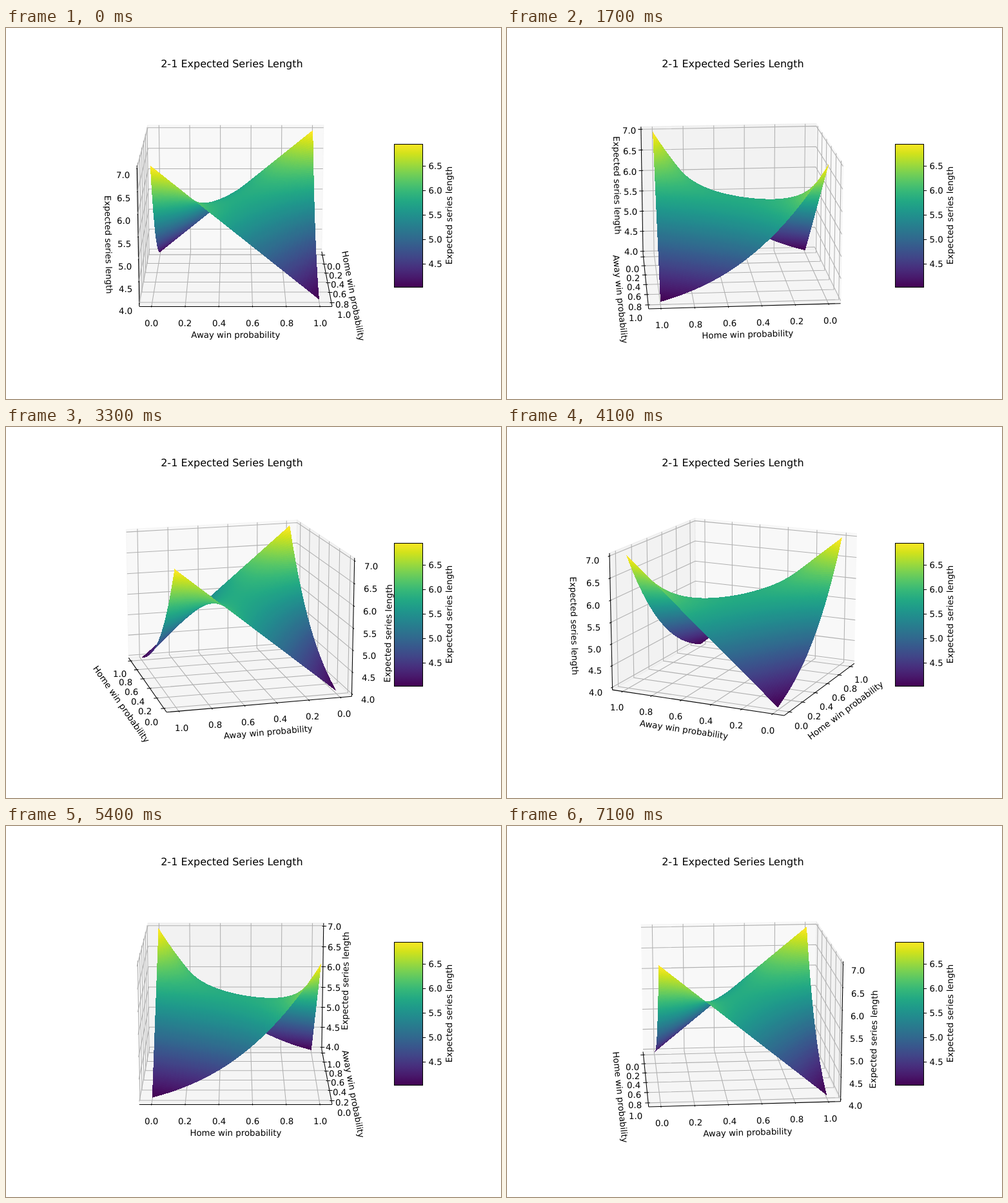
These frames come from a looping animation (768x576 px, 7.2 s). An HTML page with a canvas:

```html
<!DOCTYPE html>
<html lang="en">
<head>
<meta charset="utf-8">
<title>Expected Series Length</title>
<style>
html, body { margin: 0; width: 100%; height: 100%; overflow: hidden; background: #fff; }
svg, canvas { position: absolute; left: 0; top: 0; width: 768px; height: 576px; }
text { font-family: "DejaVu Sans", sans-serif; font-size: 13.333px; fill: #000; text-rendering: geometricPrecision; }
.mid { text-anchor: middle; }
.grid { fill: none; stroke: #b0b0b0; stroke-width: 1.067; }
.line { fill: none; stroke: #000; stroke-width: 1.067; }
.pane { fill-opacity: .5; stroke-opacity: .5; stroke-width: 1.333; }
</style>
</head>
<body>
<svg id="axes" viewBox="0 0 768 576"></svg>
<canvas id="surface" width="768" height="576"></canvas>
<svg id="legend" viewBox="0 0 768 576"></svg>
<script>
const W = 768, H = 576, FRAMES = 72, STEP_MS = 100, STEP_DEG = 5;
const N = 100, CELLS = N * N;
const rad = d => d * Math.PI / 180;

// Viridis, evenly spaced stops
const STOPS = ("440154 481a6c 472f7d 414487 39568c 31688e 2a788e 23888e " +
  "1f988b 22a884 35b779 54c568 7ad151 a5db36 d2e21b fde725").split(" ");
const RGB = STOPS.map(s => [0, 2, 4].map(i => parseInt(s.slice(i, i + 2), 16)));
const LUT = Array.from({ length: 256 }, (_, i) => {
  const t = i / 255 * 15, k = Math.min(14, Math.floor(t)), f = t - k;
  const [r, g, b] = RGB[k].map((c, j) => Math.round(c + (RGB[k + 1][j] - c) * f));
  return (255 << 24 | b << 16 | g << 8 | r) >>> 0;
});

// Camera: normalised box coordinates (-0.5..0.5) to stage pixels
const SIZE = [8 / 7, 8 / 7, 6 / 7], SCALE = 443.52 / 0.185, CX = 356.39, CY = 284.89;
const SE = Math.sin(rad(15)), CE = Math.cos(rad(15));
let sa = 0, ca = 1;
function project(p) {
  const x = p[0] * SIZE[0], y = p[1] * SIZE[1], z = p[2] * SIZE[2];
  const near = x * ca + y * sa, right = y * ca - x * sa;
  const depth = 10 - near * CE - z * SE;
  return [CX + SCALE * right / depth, CY - SCALE * (z * CE - near * SE) / depth, depth];
}

// Best of seven, three away games and n - 3 home games among the first n
const CHOOSE = [[1], [1, 1], [1, 2, 1], [1, 3, 3, 1]];
const binom = (n, k, p) => CHOOSE[n][k] * p ** k * (1 - p) ** (n - k);
function seriesLength(home, away) {
  let sum = 4;
  for (let n = 4; n < 7; n++)
    for (let i = 0; i <= n - 3; i++)
      for (let j = 0; j <= 3; j++)
        if (i + j < 4 && n - i - j < 4) sum += binom(n - 3, i, home) * binom(3, j, away);
  return sum;
}

const unit = v => (v + 0.05) / 1.1 - 0.5;
const unitZ = v => (v - 4) / 3 - 0.5;
const verts = [], values = [];
for (let i = 0; i <= N; i++)
  for (let j = 0; j <= N; j++) {
    const e = seriesLength(i / N, j / N);
    values.push(e);
    verts.push([unit(i / N), unit(j / N), unitZ(e)]);
  }
const quads = [];
for (let i = 0; i < N; i++)
  for (let j = 0; j < N; j++) {
    const k = i * (N + 1) + j;
    quads.push([k, k + 1, k + N + 2, k + N + 1]);
  }
const means = quads.map(q => q.reduce((s, k) => s + values[k], 0) / 4);
const LOW = Math.min(...means), HIGH = Math.max(...means);
const tints = means.map(m => LUT[Math.min(255, Math.floor((m - LOW) / (HIGH - LOW) * 256))]);

const ctx = document.getElementById("surface").getContext("2d");
const image = ctx.createImageData(W, H);
const pixels = new Uint32Array(image.data.buffer);
const depths = new Float64Array(CELLS);
const order = Array.from({ length: CELLS }, (_, i) => i);

// Hard-edged fill, one span per pixel row
function fillQuad(pts, tint) {
  const ys = pts.map(p => p[1]);
  const top = Math.ceil(Math.min(...ys) - 0.5), end = Math.ceil(Math.max(...ys) - 0.5);
  for (let y = top; y < end; y++) {
    const c = y + 0.5;
    let lo = Infinity, hi = -Infinity;
    for (let i = 0; i < 4; i++) {
      const a = pts[i], b = pts[(i + 1) % 4];
      if ((a[1] <= c) === (b[1] <= c)) continue;
      const x = a[0] + (c - a[1]) / (b[1] - a[1]) * (b[0] - a[0]);
      lo = Math.min(lo, x);
      hi = Math.max(hi, x);
    }
    if (lo <= hi) pixels.fill(tint, y * W + Math.ceil(lo - 0.5), y * W + Math.ceil(hi - 0.5));
  }
}

function drawSurface() {
  const pts = verts.map(project);
  quads.forEach((q, i) => {
    depths[i] = pts[q[0]][2] + pts[q[1]][2] + pts[q[2]][2] + pts[q[3]][2];
  });
  order.sort((a, b) => depths[b] - depths[a]);
  pixels.fill(0);
  for (const i of order) fillQuad(quads[i].map(k => pts[k]), tints[i]);
  ctx.putImageData(image, 0, 0);
}

// Axes
const EDGE = 0.5 + 1 / 48, DELTA = 1 / 12, PER_POINT = 48 / 665.28;
const probTicks = [0, 1, 2, 3, 4, 5].map(k => k / 5);
const AXES = [
  { name: "Home win probability", flip: 1, pane: "#f2f2f2", ticks: probTicks, pos: unit },
  { name: "Away win probability", flip: 0, pane: "#e6e6e6", ticks: probTicks, pos: unit },
  { name: "Expected series length", flip: 0, pane: "#ececec", pos: unitZ,
    ticks: [0, 1, 2, 3, 4, 5, 6].map(k => 4 + k / 2) }
];
const fix = v => v.toFixed(2);
const put = (p, i, v) => p.map((c, k) => k === i ? v : c);
const path = pts => pts.map(p => fix(p[0]) + "," + fix(p[1])).join(" ");
const poly = (cls, pts, extra = "") => `<polyline class="${cls}" points="${path(pts)}" ${extra}/>`;
const snap = v => Math.floor(v + 0.5) + 0.5;

function stroke(a, b) {
  a = project(a);
  b = project(b);
  for (const k of [0, 1])
    if (Math.abs(a[k] - b[k]) < 1e-4) a[k] = b[k] = snap(a[k]);
  return poly("line", [a, b]);
}

// Push a point away from the box, except along its own axis
const outward = (p, i, points) => p.map((c, k) =>
  k === i ? c : c + (c < 0 ? -1 : 1) * points * PER_POINT * DELTA);

function pane(axis, i, far) {
  const [a, b] = [0, 1, 2].filter(k => k !== i);
  const pts = [[-1, -1], [1, -1], [1, 1], [-1, 1]].map(([u, v]) =>
    project(put(put(far, a, u * EDGE), b, v * EDGE)));
  return poly("pane", pts, `fill="${axis.pane}" stroke="${axis.pane}"`);
}

function axisLabel(name, i, from, to) {
  const a = project(from), b = project(to);
  const [x, y] = project(outward(put(from, i, 0), i, 25));
  let angle = (Math.atan2(a[1] - b[1], b[0] - a[0]) * 180 / Math.PI + 360) % 180;
  if (angle > 90.0001) angle -= 180;
  return `<text class="mid" y="3.5" transform="translate(${fix(x)} ${fix(y)}) rotate(${fix(-angle)})">${name}</text>`;
}

function drawAxis(axis, i, far) {
  const f = axis.flip, from = put(far, f, -far[f]), to = put(from, i, -from[i]);
  const side = Math.sign(far[f]) * DELTA;
  let out = stroke(from, to) + axisLabel(axis.name, i, from, to);
  for (const t of axis.ticks) {
    const p = put(far, i, axis.pos(t)), n = (i + 1) % 3, m = (i + 2) % 3;
    out += poly("grid", [put(p, n, -p[n]), p, put(p, m, -p[m])].map(project));
  }
  for (const t of axis.ticks) {
    const p = put(from, i, axis.pos(t));
    out += stroke(put(p, f, p[f] + 0.1 * side), put(p, f, p[f] - 0.2 * side));
    const [x, y] = project(outward(p, i, 11.5));
    out += `<text x="${Math.round(x - 10.3)}" y="${Math.round(y + 10)}">${t.toFixed(1)}</text>`;
  }
  return out;
}

function drawAxes() {
  const far = [ca < -1e-9 ? EDGE : -EDGE, sa < -1e-9 ? EDGE : -EDGE, -EDGE];
  document.getElementById("axes").innerHTML =
    AXES.map((a, i) => pane(a, i, far)).join("") +
    AXES.map((a, i) => drawAxis(a, i, far)).join("");
}

function drawLegend() {
  const stops = STOPS.map((s, i) => `<stop offset="${i / 15}" stop-color="#${s}"/>`).join("");
  let out = `<defs><linearGradient id="ramp" x1="0" y1="1" x2="0" y2="0">${stops}</linearGradient></defs>
    <text class="mid" x="350.4" y="61" style="font-size:16px">2-1 Expected Series Length</text>
    <rect x="602" y="180" width="44" height="222" fill="url(#ramp)"/>
    <rect class="line" x="602.5" y="180.5" width="44" height="222"/>
    <text class="mid" transform="translate(692 291) rotate(-90)">Expected series length</text>`;
  for (let v = 4.5; v < 7; v += 0.5) {
    const y = 401.76 - (v - LOW) / (HIGH - LOW) * 221.76;
    out += poly("line", [[646.5, snap(y)], [651.2, snap(y)]]) +
      `<text x="655.6" y="${Math.round(y + 5)}">${v.toFixed(1)}</text>`;
  }
  document.getElementById("legend").innerHTML = out;
}

let shown = -1;
function render(ms) {
  const frame = Math.floor(ms / STEP_MS) % FRAMES;
  if (frame === shown) return;
  shown = frame;
  sa = Math.sin(rad(frame * STEP_DEG));
  ca = Math.cos(rad(frame * STEP_DEG));
  drawAxes();
  drawSurface();
}

const start = performance.now();
function tick() {
  render(performance.now() - start);
  requestAnimationFrame(tick);
}
drawLegend();
tick();
</script>
</body>
</html>
```
